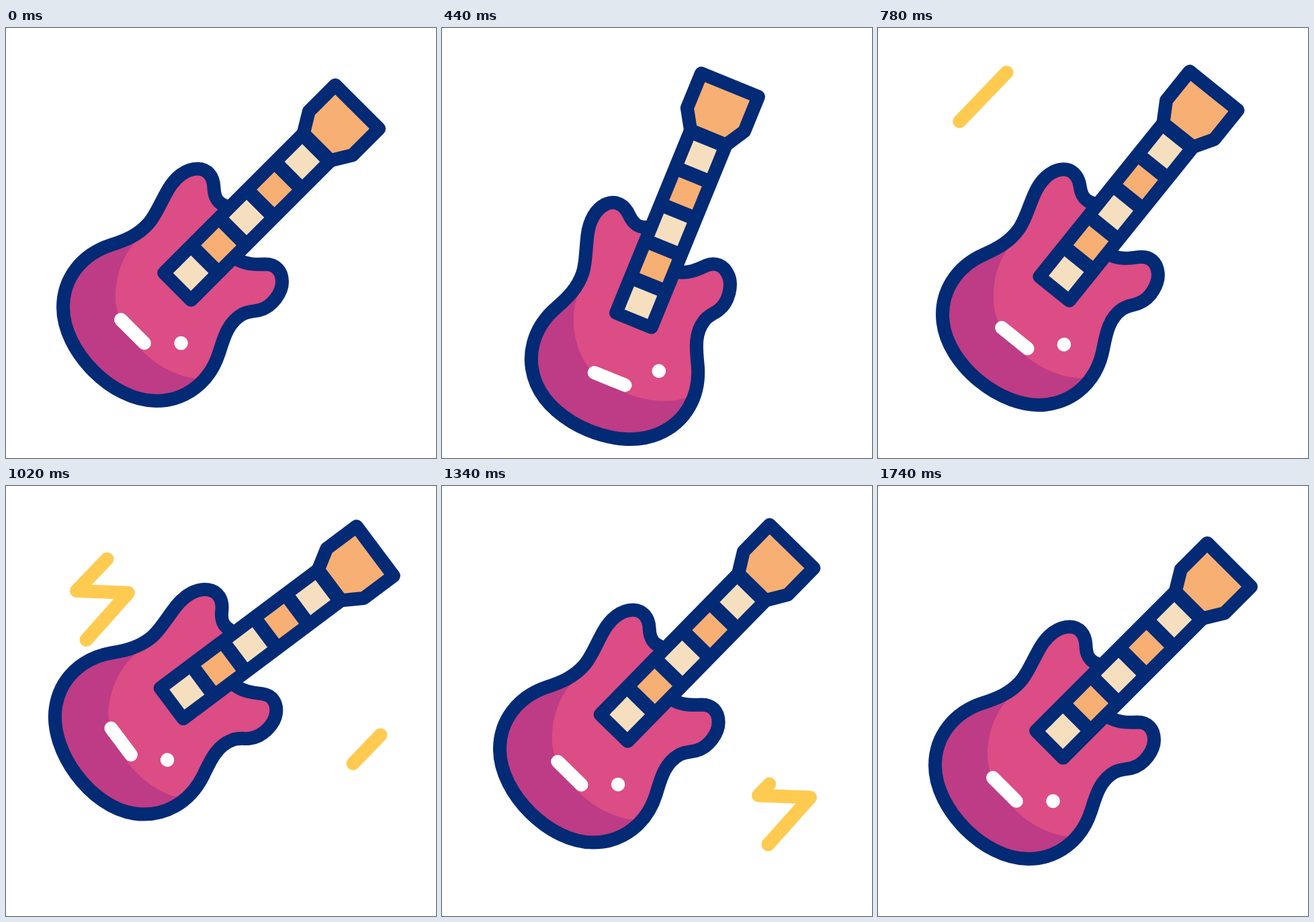
Recreate the animation shown at these times as an HTML page. Size 640 by 640 pixels, loop 2400 ms.

```html
<!DOCTYPE html>
<html lang="en">
<head>
<meta charset="utf-8">
<title>Guitar</title>
<style>
  html, body { margin: 0; width: 100%; height: 100%; overflow: hidden; background: #fff; }
  svg { display: block; width: 100vw; height: 100vh; }
  .line, .bolt { stroke-width: 20; stroke-linejoin: round; stroke-linecap: round; }
  .line { stroke: #032a75; }
  .bolt { fill: none; stroke: #fecb50; }
</style>
</head>
<body>
<svg viewBox="0 0 640 640">
  <defs>
    <path id="body" d="M325 264C313 259 310 250 309.5 238C309 220 299 209.5 285 209.5
      C268 209.5 252 222 241 241C228 264 222 280 212 291C197 308 178 316 156 323
      C113 337 85 372 85 416C85 481 158 555 223 555C268 555 303 527 317 484
      C324 462 330 438 352 426C361 421 369 422 377 420C397 415 411 393 411 378
      C411 361 401 351.5 386 351.5C370 352 358 352 345 345Z"/>
    <clipPath id="inside"><use href="#body"/></clipPath>
    <path id="zigzag" pathLength="1" d="M191.5 66L105 156L182 159L119.5 229"/>
  </defs>
  <use class="bolt" href="#zigzag"/>
  <use class="bolt" href="#zigzag" x="366" y="304.5"/>
  <g id="guitar">
    <use href="#body" fill="#dc4c85"/>
    <path clip-path="url(#inside)" fill="#bd3c85"
      d="M191 320C172 343 163 370 163 402C163 452 226 522 292 522V600H40V290H205Z"/>
    <use href="#body" class="line" fill="none"/>
    <g id="neck" transform="translate(320 320) rotate(45)">
      <path d="M-24.7 186H24.7" stroke="#fff" stroke-width="20" stroke-linecap="round"/>
      <circle cx="63.3" cy="147.4" r="10.3" fill="#fff"/>
      <path class="line" fill="#032a75" d="M-28.5 -202H28.5V91.5H-28.5Z"/>
      <path class="line" fill="#f7af73"
        d="M-46 -286.5H46V-231L28.5 -202H-28.5L-46 -231Z"/>
    </g>
  </g>
</svg>
<script>
  const LOOP = 2400, STEP = 20;
  const BOLT_START = 684, BOLT_TIME = 280;

  const smooth = u => u * u * (3 - 2 * u);
  const easeOut = power => u => 1 - (1 - u) ** power;

  // Each move runs from the end of the one before it
  const turn = [
    { end: 620, to: -28.6, ease: smooth },
    { end: 930, to: 14.2, ease: smooth },
    { end: 1320, to: -0.6, ease: easeOut(2) },
    { end: 1640, to: 1.1, ease: smooth },
    { end: 1740, to: 0, ease: smooth }
  ];
  const lift = [
    { end: 620, to: 37.8, ease: smooth },
    { end: 1140, to: -64.5, ease: easeOut(1.4) },
    { end: 1740, to: 0, ease: easeOut(2.3) }
  ];

  const guitar = document.getElementById('guitar');
  const neck = document.getElementById('neck');
  const bolts = [...document.querySelectorAll('.bolt')];

  for (let i = 0; i < 5; i++) {
    const fret = document.createElementNS('http://www.w3.org/2000/svg', 'rect');
    const attrs = { x: -18.6, y: 44.8 - 58.6 * i, width: 37.2, height: 37.2,
                    fill: i % 2 ? '#f7af73' : '#f5dfbf' };
    for (const name in attrs) fret.setAttribute(name, attrs[name]);
    neck.append(fret);
  }

  function valueAt(moves, t) {
    let start = 0, from = 0;
    for (const { end, to, ease } of moves) {
      if (t < end) return from + (to - from) * ease((t - start) / (end - start));
      start = end;
      from = to;
    }
    return from;
  }

  const clamp = x => Math.min(1, Math.max(0, x));

  function drawBolt(bolt, t) {
    const head = clamp(t / BOLT_TIME), tail = clamp(t / BOLT_TIME - 1);
    bolt.style.display = head > tail ? '' : 'none';
    bolt.style.strokeDasharray = `${head - tail} 3`;
    bolt.style.strokeDashoffset = -tail;
  }

  function draw(t) {
    guitar.setAttribute('transform',
      `translate(0 ${valueAt(lift, t)}) rotate(${valueAt(turn, t)} 320 320)`);
    bolts.forEach((bolt, i) => drawBolt(bolt, t - BOLT_START - i * BOLT_TIME));
  }

  function tick() {
    const t = performance.now() % LOOP;
    draw(Math.floor(t / STEP) * STEP);
    requestAnimationFrame(tick);
  }
  tick();
</script>
</body>
</html>
```
